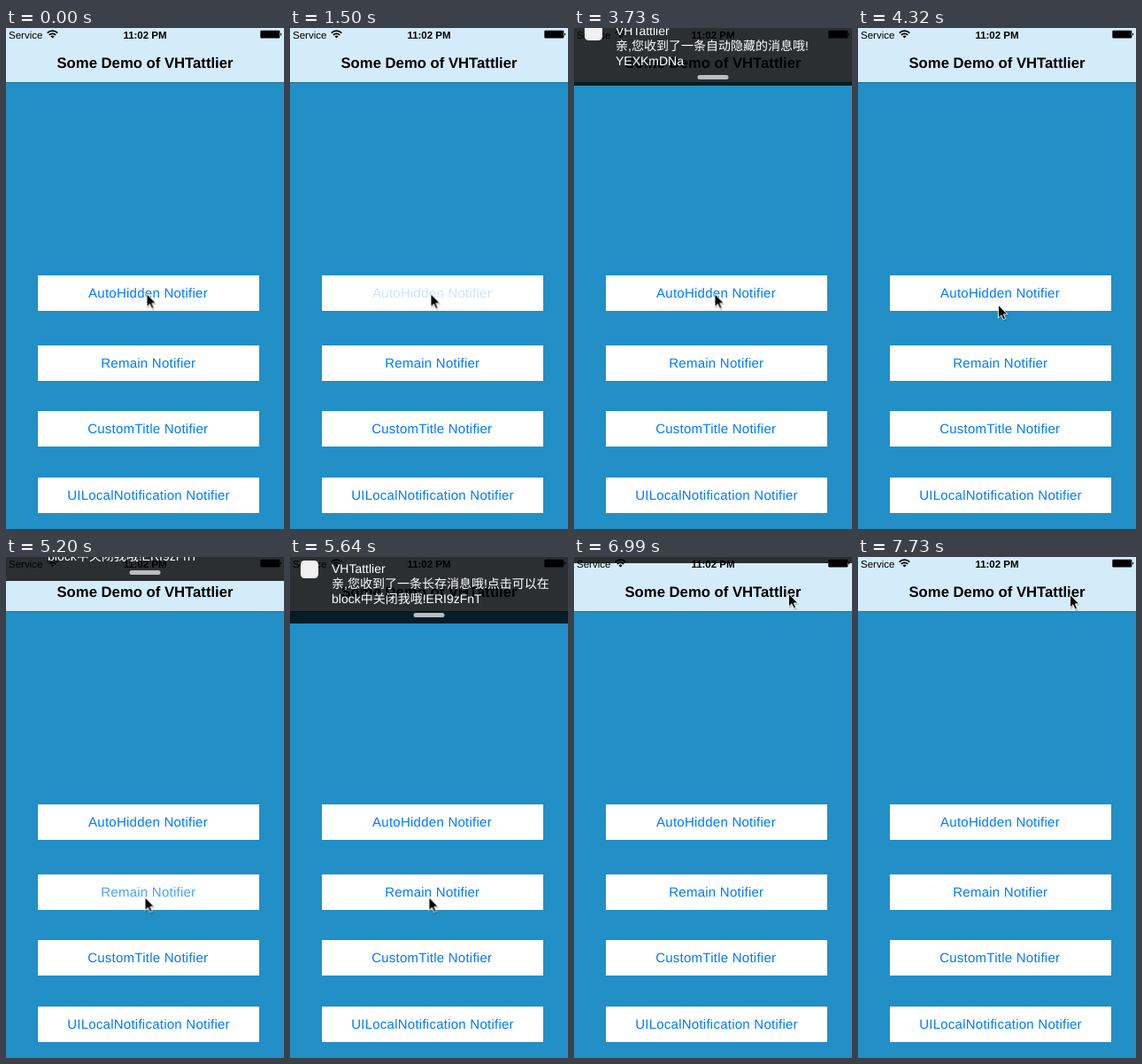
An HTML page for the animation above (8000 ms loop, 314 by 565 pixels).

```html
<!DOCTYPE html>
<html lang="en">
<head>
<meta charset="utf-8">
<title>Banner demo</title>
<style>
  html, body { margin: 0; width: 100%; height: 100%; overflow: hidden; background: #228fc6; }
  svg { display: block; width: 314px; height: 565px; }
  text {
    font-family: "Liberation Sans", "Noto Sans CJK SC", "Noto Sans CJK", sans-serif;
    text-rendering: geometricPrecision;
  }
  .mid { text-anchor: middle; }
  .status { font-size: 11.5px; }
  .bold { font-weight: bold; }
  .title { font-size: 16.7px; }
  .label { font-size: 15px; letter-spacing: .25px; fill: #007aff; }
  .banner text { font-size: 14px; font-weight: 300; fill: #fff; }

  /* The screen refreshes in discrete steps, so every track holds its value. */
  .anim { animation: 8s step-end infinite; }
  #hide-label { animation-name: press-hide; }
  #stay-label { animation-name: press-stay; }
  #hide-banner { animation-name: slide-hide; }
  #stay-banner { animation-name: slide-stay; }
  #cursor { animation-name: point; }

  @keyframes press-hide {
    0% { opacity: 1 }
    18.75% { opacity: .2 }
    20.5% { opacity: .4 }
    22.375% { opacity: .85 }
    24.125%, 100% { opacity: 1 }
  }
  @keyframes press-stay {
    0% { opacity: 1 }
    63.25% { opacity: .2 }
    65% { opacity: .7 }
    66.875%, 100% { opacity: 1 }
  }
  @keyframes slide-hide {
    0% { transform: translateY(-80px) }
    20.5% { transform: translateY(-70px) }
    22.375% { transform: translateY(-37px) }
    24.125% { transform: translateY(-3px) }
    26% { transform: translateY(0) }
    46.625% { transform: translateY(-10px) }
    48.5% { transform: translateY(-50px) }
    50.25%, 100% { transform: translateY(-80px) }
  }
  @keyframes slide-stay {
    0% { transform: translateY(-80px) }
    65% { transform: translateY(-48px) }
    66.875% { transform: translateY(-8px) }
    68.75% { transform: translateY(0) }
    83.625% { transform: translateY(-1px) }
    85.5% { transform: translateY(-29px) }
    87.375% { transform: translateY(-68px) }
    89.25%, 100% { transform: translateY(-80px) }
  }
  @keyframes point {
    0% { transform: translate(158.5px, 299.5px) }
    54% { transform: translate(158px, 312px) }
    55.875% { transform: translate(157px, 360px) }
    57.625% { transform: translate(156.5px, 383.5px) }
    70.625% { transform: translate(159px, 375px) }
    72.5% { transform: translate(173px, 320px) }
    74.25% { transform: translate(198px, 220px) }
    76.125% { transform: translate(220px, 130px) }
    78% { transform: translate(232px, 80px) }
    79.875% { transform: translate(240px, 50px) }
    81.75% { transform: translate(242px, 42px) }
    83.625% { transform: translate(242px, 41px) }
    92.875% { transform: translate(241px, 41px) }
    94.75% { transform: translate(240px, 42px) }
    96.625%, 100% { transform: translate(239px, 42px) }
  }
</style>
</head>
<body>
<svg viewBox="0 0 314 565">
  <defs>
    <g id="panel">
      <rect y="-10" width="314" height="85" fill="#000" fill-opacity=".8"/>
      <rect x="12" y="4" width="20" height="20" rx="4.5" fill="#f1f1f1"/>
      <rect x="139.5" y="63" width="35" height="5" rx="2.5" fill="#bbbdbe"/>
    </g>
  </defs>

  <rect width="314" height="565" fill="#228fc6"/>

  <rect width="314" height="61" fill="#d4ecfa"/>
  <rect y="61" width="314" height=".6" fill="#000" fill-opacity=".3"/>
  <text class="status" x="3" y="11.5">Service</text>
  <g fill="none" stroke="#000" stroke-width="1.7">
    <path d="M46.7 5.6a8.2 8.2 0 0 1 11.6 0M48.8 7.9a5.2 5.2 0 0 1 7.4 0"/>
    <path d="M52.5 11.6l-2-2.1a2.9 2.9 0 0 1 4 0z" fill="#000" stroke="none"/>
  </g>
  <text class="status bold mid" x="157" y="11.5">11:02 PM</text>
  <rect x="287.3" y="2.8" width="22" height="8.6" rx="1.2"/>
  <path d="M310 5.4a1.8 1.8 0 0 1 0 3.4z"/>
  <text class="title bold mid" x="157" y="45">Some Demo of VHTattlier</text>

  <path fill="#fff" d="M36 279h250v40h-250zM36 358h250v40h-250zM36 432h250v40h-250zM36 507h250v40h-250z"/>
  <text id="hide-label" class="label mid anim" x="160.5" y="304.2">AutoHidden Notifier</text>
  <text id="stay-label" class="label mid anim" x="160.8" y="383.2">Remain Notifier</text>
  <text class="label mid" x="160.2" y="457.2">CustomTitle Notifier</text>
  <text class="label mid" x="161" y="532.2">UILocalNotification Notifier</text>

  <g id="hide-banner" class="banner anim">
    <use href="#panel"/>
    <text x="47" y="18.2">VHTattlier</text>
    <text x="47" y="34.8">亲,您收到了一条自动隐藏的消息哦!</text>
    <text x="47" y="51.8">YEXKmDNa</text>
  </g>
  <g id="stay-banner" class="banner anim">
    <use href="#panel"/>
    <text x="47" y="18.2">VHTattlier</text>
    <text x="47" y="34.8">亲,您收到了一条长存消息哦!点击可以在</text>
    <text x="47" y="51.8">block中关闭我哦!ERI9zFnT</text>
  </g>

  <g id="cursor" class="anim">
    <path d="M1 2V17l3.5-3.2 2.4 5.2 2.6-1.1-2.4-5.1h4.8z" fill="#000" fill-opacity=".2"/>
    <path d="M.5 .3V15l3.4-3.2 2.3 5.1 2.3-1-2.2-5h4.5z" stroke="#fff" stroke-width=".9" stroke-linejoin="round"/>
  </g>
</svg>
</body>
</html>
```
